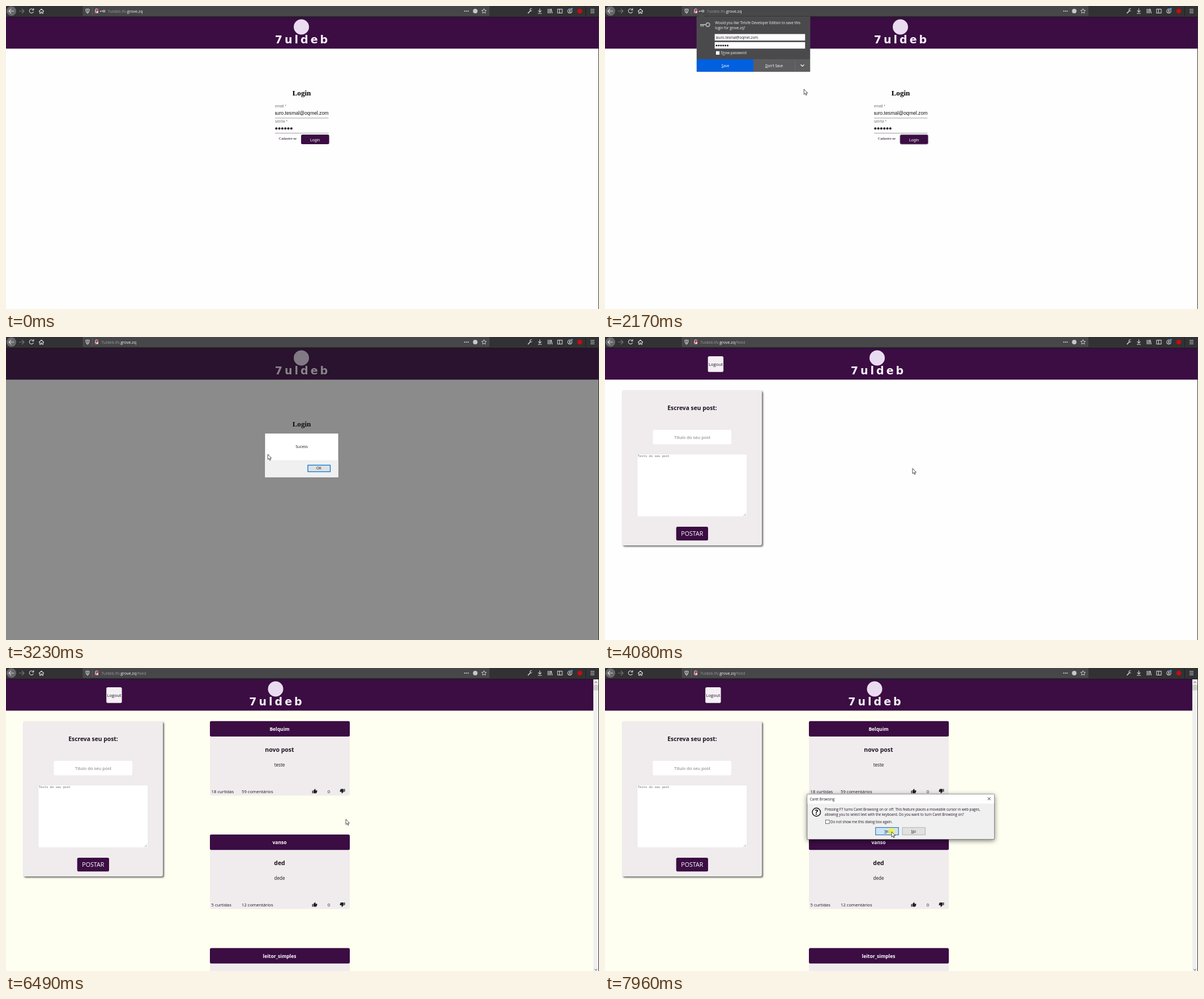
An HTML page that plays this animation: 1047x535 px, repeating every 8000 ms.

```html
<!DOCTYPE html>
<html lang="pt">
<head>
<meta charset="utf-8">
<style>
html, body { margin: 0; width: 100%; height: 100%; overflow: hidden; background: #fefefe; }
svg { display: block; }
text { font-family: "Open Sans", "Noto Sans", sans-serif; white-space: pre; }
.b { font-weight: 700; }
.m { text-anchor: middle; }
.e { text-anchor: end; }
.arial { font-family: "Liberation Sans", Arial, sans-serif; }
.serif { font-family: "Liberation Serif", Times, serif; }
.mono { font-family: "Liberation Mono", Courier, monospace; }
.mark { font-family: "DejaVu Sans", sans-serif; font-weight: 700; letter-spacing: 4px; }
.u { text-decoration: underline; }
.icon { fill: none; stroke: #d6d6d8; stroke-width: 1.1; }
</style>
</head>
<body>
<script>
const PURPLE = '#3b0d43', PANEL = '#f0eced', INK = '#1d1320';
const MAIL = 'lauro.tesmal@oqmel.zom', SITE = 'grove.zq';

const rect = (x, y, w, h, fill, more = '') =>
  `<rect x="${x}" y="${y}" width="${w}" height="${h}" fill="${fill}" ${more}/>`;
const text = (x, y, size, str, cls = '', fill = INK) =>
  `<text x="${x}" y="${y}" font-size="${size}" class="${cls}" fill="${fill}">${str}</text>`;
const path = (d, more = '') => `<path d="${d}" ${more}/>`;
const circle = (x, y, r, more = '') => `<circle cx="${x}" cy="${y}" r="${r}" ${more}/>`;
const group = (id, body, more = '') => `<g id="${id}" ${more}>${body}</g>`;
const key = c => `<tspan class="u">${c}</tspan>`;
const dots = (x, y, step, r) =>
  Array.from({length: 6}, (_, i) => circle(x + i * step, y, r, `fill="${INK}"`)).join('');

const toolbar = () => rect(0, 0, 1047, 20, '#323234') + rect(0, 19, 1047, 1, '#19191b') +
  rect(136, .5, 717, 16.5, '#474749', 'stroke="#59595b" stroke-width=".5"') +
  rect(152, 2, .7, 14, '#68686a') + rect(1023, 1, .7, 17, '#19191b') +
  circle(9.5, 9, 8.5, 'fill="#68686a"') +
  `<g class="icon">` +
  path('M14 9H5.5M9 5L5 9l4 4') +
  path('M23 9h8.5M28 5l4 4-4 4', 'stroke="#77777a"') +
  path('M48 6.500A3.700 3.700 0 1 0 48.500 10M48.800 4v3.200h-3.200') +
  path('M58 9.500L62.500 5.300 67 9.500M59.500 9v4h2v-2.500h2V13h2V9') +
  path('M141 5.800q3-.2 3-1 0 .8 3 1 0 5-3 7-3-2-3-7zM144 6v5') +
  path('M158 8.500V7a2 2 0 0 1 4 0v1.500') + rect(157, 8.5, 6, 4, '#d6d6d8', 'stroke="none"') +
  path('M156.500 13l7-8', 'stroke="#e8304f" stroke-width="1.4"') +
  path('M844 4.700l1.200 2.700 3 .3-2.200 2 .6 3-2.600-1.500-2.600 1.500.6-3-2.200-2 3-.3z', 'stroke-width=".9"') +
  path('M921.500 13l4.500-4.700', 'stroke-width="1.6"') + path('M928.500 5.200a2 2 0 1 0 .2 2.800') +
  path('M942.500 4.500v6M939.700 8l2.800 2.800L945.300 8M939 13h7') +
  path('M957 5v8M959.300 5v8M961.500 5v8M962.500 5l2 8') +
  path('M974 5.500h8v7h-8zM977.500 5.500v7') +
  circle(995.5, 9, 3.7) + path('M993.500 11.500q2-2.500 4 0') +
  path('M1032 6h7M1032 9h7M1032 12h7') + '</g>' +
  [810, 813, 816].map(x => circle(x, 9, 1, 'fill="#d6d6d8"')).join('') +
  circle(828.5, 9, 4, 'fill="#c8c8ca"') + circle(995.5, 8, 1.3, 'fill="#d6d6d8"') +
  circle(999, 5, 1.8, 'fill="#2f95ff"') + circle(1013, 9, 4.3, 'fill="#c50d12"') +
  group('keyIcon', circle(173, 9, 1.7) + path('M171.300 9H166.500v1.800'), 'class="icon"') +
  group('url', text(0, 12, 7.1,
    `7uldeb.lfv.<tspan fill="#f4f4f5">${SITE}</tspan><tspan id="feedPath">/feed</tspan>`, '', '#98989a'));

const logo = () => circle(521.5, 37, 13.5, 'fill="#eadcf0"') +
  text(523.5, 66, 19, '7uldeb', 'mark m', '#f7f0fa');

const login = () => text(522, 157.5, 13.1, 'Login', 'serif b m', '#000') +
  text(475, 179, 6.5, 'email *', 'arial', '#757575') +
  `<svg x="475" y="180" width="94.5" height="16">${text(94.5, 12, 8.7, MAIL, 'arial e', '#111')}</svg>` +
  rect(475, 197.5, 94.5, .8, '#888') +
  text(475, 205.5, 6.5, 'senha *', 'arial', '#757575') +
  dots(477.3, 216.3, 5.3, 2) + rect(475, 224, 94.5, .8, '#888') +
  text(481.8, 236.3, 6.7, 'Cadastre-se', 'serif', '#1a0620') +
  rect(521, 227, 49.6, 17, PURPLE, 'rx="2.5"') +
  text(545.5, 238.5, 7, 'Login', 'arial m', '#fff') +
  group('ring', rect(520.7, 227, 50, 17.2, 'none', 'rx="2.7" stroke="#a9a4b8" stroke-width=".9"'));

const thumb = (x, y, turn) => path(
  'M1 21h4V9H1zM23 10q0-2-2-2h-6l1-5-2-2-7 7v11q0 2 2 2h9q1.500 0 2-1l3-7z',
  `fill="#222" transform="translate(${x} ${y}) rotate(${turn}) scale(.4) translate(-12 -11.5)"`);

const post = (y, name, title, body, likes, comments) => `<g transform="translate(0 ${y})">` +
  rect(360, 20, 247, 111.5, PANEL, 'rx="3"') + rect(360, 0, 247, 27.3, PURPLE, 'rx="2.5"') +
  text(483, 17.2, 8.5, name, 'b m', '#fff') + text(483, 54, 10.5, title, 'b m') +
  text(483, 80.3, 8.1, body, 'm') +
  text(362.6, 127.2, 7.7, likes + ' curtidas') + text(416, 127.2, 7.7, comments + ' comentários') +
  text(570, 127.2, 7.7, '0', 'm') + thumb(545, 123.7, 0) + thumb(594, 123.7, 180) + '</g>';

const editor = () =>
  rect(30, 94, 247, 274, PANEL, 'rx="3" style="filter:drop-shadow(2px 2px 1.5px #666)"') +
  text(154, 128.5, 10.3, 'Escreva seu post:', 'b m') +
  rect(84.5, 164, 138.5, 25.5, '#fff', 'rx="2.5"') +
  text(154, 179.6, 7.7, 'Título do seu post', 'm', '#757575') +
  rect(57, 207, 193.7, 110, '#fff', 'rx="2" stroke="#ddd" stroke-width=".4"') +
  text(57.8, 212, 5.5, 'Texto do seu post', 'mono', '#666') +
  path('M244.500 316l4.500-4.500M247 316l2-2', 'stroke="#777" stroke-width=".6"') +
  rect(125.7, 335, 56.3, 24.2, PURPLE, 'rx="2.5"') +
  text(153.8, 351.4, 10.7, 'POSTAR', 'm', '#fff');

const posts = () => post(93.7, 'Belquim', 'novo post', 'teste', 18, 59) +
  post(294, 'vanso', 'ded', 'dede', 5, 12) + post(494.5, 'leitor_simples', '', '', '', '');

const scrollbar = () => rect(1037, 20, 9.5, 515, '#f0f0f0') + rect(1037.5, 29.5, 8.5, 10, '#cdcdcd') +
  path('M1039.500 26.500l2-2.500 2 2.500M1039.500 531.500l2 2.500 2-2.500', 'fill="none" stroke="#505050"');

const savePrompt = () => path('M162 19h4l4.500-5 4.500 5h187v97H162z', 'fill="#4a4a4c" stroke="#5c5c5e" stroke-width=".5"') +
  circle(181.5, 33, 3.2, 'fill="none" stroke="#ababad" stroke-width="2"') +
  path('M178 33h-10M169.500 33v3.500M173 33v3.500', 'stroke="#ababad" stroke-width="1.8"') +
  text(194.3, 32, 6.25, 'Would you like Tirlofe Developer Edition to save this', '', '#f4f4f5') +
  text(194.3, 40.8, 6.25, `login for ${SITE}?`, '', '#f4f4f5') +
  rect(193.7, 49.5, 159.6, 11.5, '#fff') + rect(193.7, 63.7, 159.6, 11.5, '#fff') +
  text(195.5, 57.6, 6.25, MAIL) + dots(197, 69.8, 3.9, 1.5) +
  rect(196, 79.8, 6.2, 6.2, '#fff') +
  text(204.3, 85.3, 6.25, `S${key('h')}ow password`, '', '#f4f4f5') +
  rect(162, 94, 100, 22, '#0060df') + rect(262, 94, 100, 22, '#5d5d5f') + rect(335, 95, .6, 20, '#737375') +
  text(212.5, 107.5, 6.3, key('S') + 'ave', 'm', '#fff') +
  text(298.5, 107.5, 6.3, `${key('D')}on't Save`, 'm', '#fff') +
  path('M345.500 103.500l3 3 3-3', 'fill="none" stroke="#fff" stroke-width="1.2"');

const alertBox = () => rect(0, 20, 1046.5, 515, '#1a1a1a', 'opacity=".5"') +
  rect(457, 170, 130, 78, '#fff', 'stroke="#6b6b6b" stroke-width=".6"') + rect(457.3, 217.5, 129.4, 30.2, '#f0f0f0') +
  text(522, 196.2, 6.9, 'Sucess', 'm') +
  rect(533, 226.3, 39.5, 11.5, '#e1e1e1', 'stroke="#0078d7" stroke-width="1.3"') +
  text(552.5, 234.3, 6.5, 'OK', 'm');

const caretDialog = () =>
  rect(357, 223, 330.5, 79.5, '#f0f0f0', 'stroke="#666" stroke-width=".7" style="filter:drop-shadow(0 2px 4px #0008)"') +
  rect(357.4, 223.4, 329.7, 16, '#fff') + text(361.8, 233.5, 6.2, 'Caret Browsing') +
  path('M675.800 228.300l5 5m0-5l-5 5', 'stroke="#222" stroke-width=".9"') +
  circle(373.3, 254.5, 7.2, 'fill="#f6f6f6" stroke="#111" stroke-width="1.4"') +
  text(373.3, 258.9, 12, '?', 'b m', '#000') +
  text(388, 252.2, 6.2, 'Pressing F7 turns Caret Browsing on or off. This feature places a moveable cursor in web pages,') +
  text(388, 260.7, 6.2, 'allowing you to select text with the keyboard. Do you want to turn Caret Browsing on?') +
  rect(389.6, 268.3, 6.5, 6.5, '#fff', 'id="check" stroke="#333" stroke-width=".7"') +
  text(398, 274, 6.2, 'Do not show me this dialog box again.') +
  rect(477.8, 281.7, 40.4, 13, '#e1e1e1', 'id="yes" stroke-width=".9"') +
  rect(525, 281.7, 40.4, 13, '#e1e1e1', 'id="no" stroke-width=".9"') +
  text(498, 290.5, 6.2, key('Y') + 'es', 'm') + text(544.7, 290.5, 6.2, key('N') + 'o', 'm') +
  group('glow', circle(506, 288.5, 6, 'fill="#f0f23a" opacity=".8"'));

document.body.innerHTML = `<svg width="1047" height="535" viewBox="0 0 1047 535">` +
  rect(0, 0, 1047, 535, '#fefefe', 'id="page"') + rect(0, 20, 1047, 55.3, PURPLE) +
  group('logo', logo()) + group('login', login()) +
  group('feed', editor() + group('logout',
    rect(181.7, 34, 27.4, 27.7, '#f4f0f3', 'rx="2.5"') + text(195.4, 50.7, 7.7, 'Logout', 'm'))) +
  group('posts', posts() + scrollbar()) + rect(1046, 20, 1, 515, '#38383a') +
  group('alertBox', alertBox()) + group('dialog', caretDialog()) + toolbar() +
  group('prompt', savePrompt()) +
  group('cursor', path('M0 0v9.300l2.100-1.900 1.500 3.300 1.500-.7-1.500-3.100h2.900z',
    'fill="#fff" stroke="#222" stroke-width=".8"')) + '</svg>';

// Pointer stops: time, x, y
const route = [
  [30, 990, 530], [200, 955, 505], [500, 730, 360], [790, 548, 232], [840, 540, 228], [890, 532, 224],
  [1040, 534, 227], [1090, 541, 240], [1810, 541, 240], [2170, 351.5, 147], [2450, 301, 106],
  [2600, 299, 104], [2900, 299, 104], [3230, 462, 207], [3480, 524, 235], [3600, 543, 232],
  [5130, 543, 232], [5670, 978, 511], [5850, 978, 511], [6160, 986, 526], [6340, 986, 526],
  [6490, 600, 267], [6530, 600, 267], [7290, 532, 266], [7340, 530, 266], [7560, 506, 270],
  [7800, 506, 289], [8000, 506, 289]
];
const $ = id => document.getElementById(id);
const show = (id, on) => $(id).style.display = on ? '' : 'none';
const clamp = v => Math.max(0, Math.min(1, v));
const move = (id, x, y) => $(id).setAttribute('transform', `translate(${x} ${y})`);
const paint = (id, fill, stroke) => {
  $(id).setAttribute('fill', fill);
  $(id).setAttribute('stroke', stroke);
};

function pointer(t) {
  const i = Math.max(1, route.findIndex(p => p[0] > t));
  const [a, b] = [route[i - 1], route[i]];
  const k = clamp((t - a[0]) / (b[0] - a[0]));
  return [a[1] + (b[1] - a[1]) * k, a[2] + (b[2] - a[2]) * k];
}

function draw() {
  const t = performance.now() % 8000;
  const inFeed = t >= 3700, loaded = t >= 6490, saving = t < 2750;
  const [x, y] = pointer(t);

  $('page').setAttribute('fill', loaded ? '#fffff1' : '#fefefe');
  show('login', !inFeed);
  show('ring', t >= 1090);
  show('feed', inFeed);
  show('posts', loaded);
  show('feedPath', inFeed);
  show('keyIcon', saving);
  move('url', saving ? 179.5 : 168, 0);
  move('logo', loaded ? -45.5 : inFeed ? -41 : 0, 0);
  move('logout', loaded ? -4.5 : 0, 0);

  const shown = t < 2000 ? clamp((t - 1390) / 240) ** 2 : 1 - clamp((t - 2700) / 150);
  show('prompt', shown > 0);
  $('prompt').style.opacity = shown;
  move('prompt', 0, -8 * (1 - shown));

  show('alertBox', t >= 2500 && t < 3650);
  show('dialog', t >= 7100);
  const clicked = t >= 7960;
  const onLabel = x < 510 && y > 266 && y < 277, onYes = y > 281;
  $('check').setAttribute('stroke', onLabel ? '#0078d7' : '#333');
  paint('yes', clicked ? '#cce4f7' : onYes ? '#e5f1fb' : '#e1e1e1', clicked ? '#005499' : onYes ? '#0078d7' : '#adadad');
  paint('no', '#e1e1e1', clicked ? '#adadad' : '#0078d7');
  show('glow', clicked);

  show('cursor', t >= 30 && (t < 6340 || loaded));
  move('cursor', x, y);
  requestAnimationFrame(draw);
}
draw();
</script>
</body>
</html>
```
